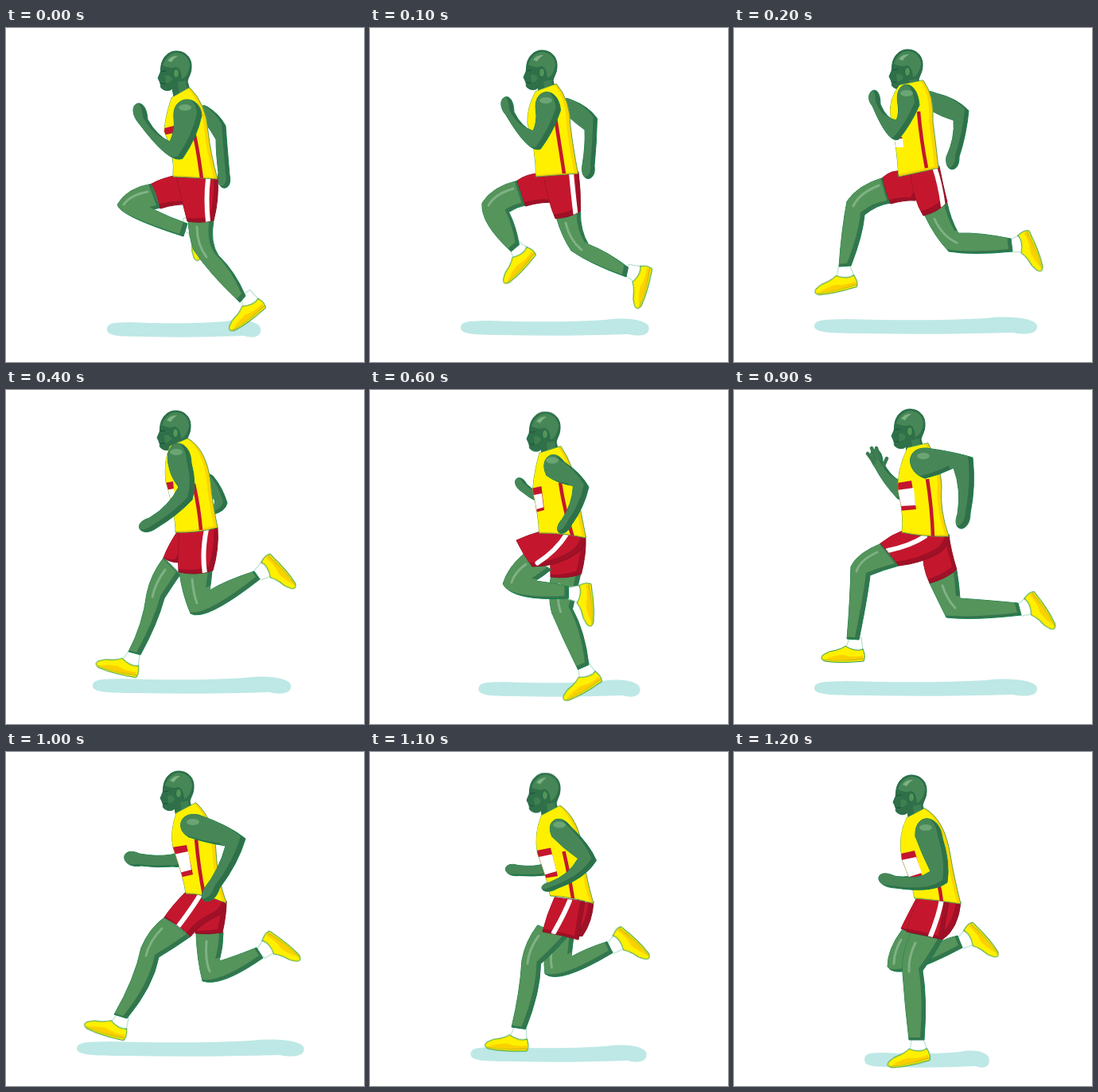
Animation, 450 px wide and 420 px high, one loop 1300 ms. Source, as an HTML page without scripts:

```html
<!DOCTYPE html>
<html lang="en">
<head>
<meta charset="utf-8">
<title>Runner</title>
<style>
html,body{margin:0;width:100%;height:100%;overflow:hidden;background:#fff}
svg{display:block;width:450px;height:420px}
[class]{animation:1.3s steps(2) infinite}
.shadow{animation-name:shadow}.head{animation-name:head}.fingers{animation-name:fingers}
.vest{animation-name:vest}.bib{animation-name:bib}.card{animation-name:card}.seam{animation-name:seam}
.nArm{animation-name:nArm}.fArm{animation-name:fArm}.ball{animation-name:ball}
.nLeg{animation-name:nLeg}.fLeg{animation-name:fLeg}
.nShine{animation-name:nShine}.fShine{animation-name:fShine}
.nShort{animation-name:nShort}.fShort{animation-name:fShort}.stripe{animation-name:stripe}
.nFoot{animation-name:nFoot}.fFoot{animation-name:fFoot}

/* two-step spans add the in-between pose, one-step spans hold */
@keyframes shadow{
0%{transform:translate(127px,368px) scaleX(.69)}
15.384%{transform:translate(101px,364px);animation-timing-function:steps(1)}
23.076%{transform:translate(86px,362px) scaleX(1.01);animation-timing-function:steps(1)}
30.769%{transform:translate(109px,361px) scaleX(.89);animation-timing-function:steps(1)}
38.461%{transform:translate(136px,366px) scaleX(.68)}
53.846%{transform:translate(137px,364px) scaleX(.77)}
69.23%{transform:translate(101px,364px);animation-timing-function:steps(1)}
76.923%{transform:translate(89px,362px) scaleX(1.02)}
92.307%{transform:translate(164px,376px) scaleX(.56);animation-timing-function:steps(1)}
}
@keyframes head{
0%{transform:translate(0,0)}
15.384%{transform:translate(4px,-2px)}
30.769%{transform:translate(-1px,-3px);animation-timing-function:steps(1)}
38.461%{transform:translate(3px,-1px)}
53.846%{transform:translate(9px,-2px)}
69.23%{transform:translate(7px,-5px);animation-timing-function:steps(1)}
76.923%{transform:translate(3px,-5px)}
92.307%{transform:translate(9px,0);animation-timing-function:steps(1)}
}
@keyframes ball{
0%{transform:translate(225px,100px)}
15.384%{transform:translate(217px,82px)}
30.769%{transform:translate(214px,78px);animation-timing-function:steps(1)}
38.461%{transform:translate(226px,88px)}
53.846%{transform:translate(232px,89px)}
69.23%{transform:translate(238px,83px);animation-timing-function:steps(1)}
76.923%{transform:translate(235px,88px)}
92.307%{transform:translate(241px,95px);animation-timing-function:steps(1)}
}
@keyframes fingers{
0%,38.461%{opacity:0;animation-timing-function:steps(1)}
53.846%{opacity:1;transform:translate(0,0)}
69.23%{opacity:1;transform:translate(4px,9px);animation-timing-function:steps(1)}
76.923%,100%{opacity:0;animation-timing-function:steps(1)}
}
@keyframes vest{
0%{d:path("M208 88Q200 112 199 130Q213 160 210 187Q236 188 266 190Q257 158 254 130Q252 96 231 75Z")}
15.384%{d:path("M208 72Q194 90 197 110Q205 150 207 187Q230 182 257 176Q253 140 250 118Q252 85 238 66Z")}
30.769%{d:path("M206 71Q198 90 201 115Q214 160 213 179Q240 180 266 173Q259 140 257 115Q252 75 229 61Z");animation-timing-function:steps(1)}
38.461%{d:path("M210 79Q200 98 204 124Q214 162 214 182Q242 183 271 184Q264 147 262 122Q256 82 233 69Z")}
53.846%{d:path("M216 80Q213 105 205 128Q211 160 211 178Q245 176 272 188Q266 160 258 130Q256 106 247 73Z")}
69.23%{d:path("M218 73Q203 105 207 130Q214 160 211 179Q240 185 270 184Q258 150 261 120Q260 95 244 67Z");animation-timing-function:steps(1)}
76.923%{d:path("M214 77Q206 100 210 120Q224 160 226 178Q250 178 277 190Q265 155 264 125Q262 85 239 64Z")}
92.307%{d:path("M217 83Q206 105 211 135Q224 165 227 184Q255 186 285 191Q276 155 272 130Q265 85 240 71Z");animation-timing-function:steps(1)}
}
@keyframes bib{
0%{d:path("M195 127L211 123L211 132L196 135Z")}
15.384%{d:path("M199 137L211 137L212 140L201 141Z")}
30.769%{d:path("M199 117L210 115L211 126L200 126Z");animation-timing-function:steps(1)}
38.461%{d:path("M202 122L217 119L220 145L206 148Z")}
53.846%{d:path("M202 126L214 123L218 157L205 161Z")}
69.23%{d:path("M204 117L223 114L229 150L208 152Z");animation-timing-function:steps(1)}
76.923%{d:path("M208 120L227 117L235 154L214 159Z")}
92.307%{d:path("M209 128L227 124L237 158L216 160Z");animation-timing-function:steps(1)}
}
@keyframes card{
0%{d:path("M196 135L199 135L199 136L196 136Z")}
15.384%{d:path("M199 139L212 139L213 150L201 150Z")}
30.769%{d:path("M200 126L211 124L213 138L203 144Z");animation-timing-function:steps(1)}
38.461%{d:path("M202 130L218 127L220 143L206 146Z")}
53.846%{d:path("M202 136L214 133L216 152L205 156Z")}
69.23%{d:path("M205 126L226 123L228 145L208 146Z");animation-timing-function:steps(1)}
76.923%{d:path("M210 129L229 125L233 148L214 153Z")}
92.307%{d:path("M210 136L229 132L236 152L217 158Z");animation-timing-function:steps(1)}
}
@keyframes seam{
0%{d:path("M235 127Q241 150 246 190")}
15.384%{d:path("M232 105Q235 140 242 176")}
30.769%{d:path("M236 118Q243 150 245 176");animation-timing-function:steps(1)}
38.461%{d:path("M243 120Q250 150 254 184")}
53.846%{d:path("M235 113Q238 150 255 183")}
69.23%{d:path("M243 112Q249 150 250 185");animation-timing-function:steps(1)}
76.923%{d:path("M239 110Q242 145 249 180")}
92.307%{d:path("M248 140Q258 160 261 188");animation-timing-function:steps(1)}
}
@keyframes nArm{
0%{d:path("M211 112C208 84 244 82 246 110Q240 138 222 164Q206 172 168 121C146 96 176 80 178 115Q190 136 206 143Q213 128 211 112Z")}
15.384%{d:path("M206 95C200 66 230 60 233 97Q222 122 207 140Q194 146 174 98C160 82 184 64 184 96Q192 115 204 116Q208 108 206 95Z")}
30.769%{d:path("M204 92C198 60 232 58 233 92Q240 118 234 138Q215 158 190 173C170 188 156 168 180 161Q205 146 217 122Q206 108 204 92Z");animation-timing-function:steps(1)}
38.461%{d:path("M214 104C210 70 244 68 246 98Q262 122 260 146Q242 168 216 180C196 188 188 170 208 165Q230 158 240 138Q226 122 214 104Z")}
53.846%{d:path("M230 111C212 102 218 74 242 83Q268 86 290 98Q296 128 292 157C294 190 264 190 275 160Q279 128 271 103Q245 113 230 111Z")}
69.23%{d:path("M240 111C216 104 214 72 242 73Q278 78 300 85Q304 120 297 155C297 181 272 180 281 156Q286 125 276 98Q258 107 240 111Z");animation-timing-function:steps(1)}
76.923%{d:path("M230 107C212 98 218 74 242 79Q280 92 301 109Q292 140 268 172C262 194 238 192 249 172Q268 148 276 118Q250 114 230 107Z")}
92.307%{d:path("M228 106C226 76 258 76 262 108Q272 140 268 164Q250 178 203 171C174 170 176 144 202 156Q232 162 247 150Q236 128 228 106Z");animation-timing-function:steps(1)}
}
@keyframes fArm{
0%{d:path("M250 118Q240 92 253 99Q268 108 276 123Q278 150 281 185C286 207 262 207 267 182Q264 158 264 140Q258 130 250 118Z")}
15.384%{d:path("M248 104Q230 72 254 82Q280 88 295 104Q292 135 283 162C284 183 264 183 267 162Q278 138 276 116Q262 112 248 104Z")}
30.769%{d:path("M252 125Q245 98 260 108Q272 122 278 142Q276 152 262 156C254 158 250 150 258 148Q264 144 262 138Q256 132 252 125Z");animation-timing-function:steps(1)}
38.461%{d:path("M225 125Q225 105 240 112Q246 125 246 140Q230 158 205 160C190 160 190 148 205 148Q225 146 228 140Q226 132 225 125Z")}
53.846%{d:path("M214 122Q228 118 220 134Q210 146 204 146Q188 128 180 98C154 72 186 54 189 89Q194 114 208 122Q212 122 214 122Z")}
69.23%{d:path("M214 112Q226 118 218 132Q212 138 206 137Q188 118 177 97C160 74 186 64 187 90Q196 108 208 114Q212 112 214 112Z");animation-timing-function:steps(1)}
76.923%{d:path("M218 126Q226 130 222 142Q216 146 210 144Q190 146 170 143C142 148 142 116 168 128Q190 132 208 129Q214 127 218 126Z")}
92.307%{d:path("M235 130Q250 130 250 140Q248 160 240 165Q220 168 205 168C188 168 188 156 204 157Q222 158 230 152Q234 140 235 130Z");animation-timing-function:steps(1)}
}
@keyframes nLeg{
0%{d:path("M229 242Q230 262 236 279Q255 308 294 345L301 337Q288 306 267 286Q256 270 261 242Z")}
15.384%{d:path("M240 236Q252 262 270 281Q300 286 350 281L348 265Q310 257 282 258Q272 240 268 220Z")}
30.769%{d:path("M218 230Q222 258 232 281Q250 292 319 238L312 228Q275 240 256 252Q258 240 259 227Z");animation-timing-function:steps(1)}
38.461%{d:path("M203 222Q192 250 196 270Q214 292 286 253L280 238Q258 244 238 254Q248 242 252 230Z")}
53.846%{d:path("M184 190Q155 195 138 218Q145 240 213 271L219 257Q200 240 178 226Q190 224 203 222Z")}
69.23%{d:path("M185 193Q155 205 147 222Q146 265 142 313L157 314Q168 260 171 233Q188 226 207 221Z");animation-timing-function:steps(1)}
76.923%{d:path("M199 208Q180 222 170 246Q162 285 136 330L152 335Q185 295 192 258Q212 246 232 232Z")}
92.307%{d:path("M222 228Q210 255 212 278Q215 320 220 362L239 362Q243 310 237 275Q250 258 262 236Z");animation-timing-function:steps(1)}
}
@keyframes fLeg{
0%{d:path("M183 196Q152 201 140 222Q142 236 223 262L228 246Q205 238 185 228Q190 227 194 226Z")}
15.384%{d:path("M188 188Q155 198 142 218Q135 255 132 300L147 299Q162 260 164 235Q180 222 197 220Z")}
30.769%{d:path("M198 211Q182 232 177 256Q172 295 154 329L169 333Q190 295 199 262Q210 245 219 232Z");animation-timing-function:steps(1)}
38.461%{d:path("M216 228Q204 252 203 278Q204 320 198 357L217 358Q228 310 227 278Q245 258 256 232Z")}
53.846%{d:path("M239 239Q242 266 254 282Q282 308 325 346L333 333Q312 296 282 273Q272 258 273 233Z")}
69.23%{d:path("M246 243Q258 268 267 286Q300 290 361 283L357 268Q315 264 284 262Q283 245 280 227Z");animation-timing-function:steps(1)}
76.923%{d:path("M239 228Q240 260 247 288Q270 296 323 259L315 246Q285 258 268 263Q273 245 273 227Z")}
92.307%{d:path("M211 224Q193 248 193 270Q205 290 287 246L281 231Q258 236 238 252Q236 240 240 230Z");animation-timing-function:steps(1)}
}
@keyframes nShine{
0%{d:path("M240 250Q240 272 252 288")}
15.384%{d:path("M252 240Q262 262 280 270")}
30.769%{d:path("M234 238Q236 258 240 268");animation-timing-function:steps(1)}
38.461%{d:path("M212 238Q204 255 208 268")}
53.846%{d:path("M180 200Q158 205 148 216")}
69.23%{d:path("M180 204Q158 214 154 228");animation-timing-function:steps(1)}
76.923%{d:path("M196 222Q180 238 176 256")}
92.307%{d:path("M228 240Q219 258 220 276");animation-timing-function:steps(1)}
}
@keyframes fShine{
0%{d:path("M178 206Q156 210 148 222")}
15.384%{d:path("M182 198Q157 208 150 224")}
30.769%{d:path("M200 226Q188 242 184 260");animation-timing-function:steps(1)}
38.461%{d:path("M224 240Q212 258 211 276")}
53.846%{d:path("M252 248Q256 268 268 282")}
69.23%{d:path("M262 246Q268 264 278 274");animation-timing-function:steps(1)}
76.923%{d:path("M252 238Q250 262 256 276")}
92.307%{d:path("M210 236Q201 252 201 266");animation-timing-function:steps(1)}
}
@keyframes nShort{
0%{d:path("M214 186Q222 220 228 243Q245 246 261 242Q268 215 266 188Z")}
15.384%{d:path("M222 180Q225 215 238 236Q255 232 268 219Q262 195 258 174Z")}
30.769%{d:path("M218 177Q216 205 217 229Q240 234 260 227Q268 200 266 173Z");animation-timing-function:steps(1)}
38.461%{d:path("M216 180Q208 202 203 222Q228 232 252 230Q272 210 270 182Z")}
53.846%{d:path("M214 178Q197 183 184 189Q192 206 204 222Q238 222 262 204Q270 195 270 185Z")}
69.23%{d:path("M212 177Q198 182 184 193Q196 205 207 221Q235 218 258 205Q272 195 270 182Z");animation-timing-function:steps(1)}
76.923%{d:path("M226 176Q208 194 199 208Q218 218 232 232Q245 215 268 205Q277 197 277 188Z")}
92.307%{d:path("M232 183Q222 205 217 226Q240 230 262 236Q266 210 270 188Z");animation-timing-function:steps(1)}
}
@keyframes fShort{
0%{d:path("M215 185Q195 189 183 196Q190 208 194 227Q215 220 240 222Q245 200 245 188Z")}
15.384%{d:path("M212 180Q198 178 187 188Q190 205 197 221Q215 216 228 217Q240 195 240 178Z")}
30.769%{d:path("M216 177Q204 195 198 211Q206 217 218 217Q230 200 230 178Z");animation-timing-function:steps(1)}
38.461%{d:path("M222 181Q220 205 216 230Q238 236 258 230Q270 205 271 182Z")}
53.846%{d:path("M235 190Q232 218 238 240Q255 240 273 233Q274 208 271 186Z")}
69.23%{d:path("M238 195Q235 220 246 243Q265 238 280 226Q272 200 270 182Z");animation-timing-function:steps(1)}
76.923%{d:path("M240 205Q237 215 238 228Q255 230 272 227Q277 205 277 188Z")}
92.307%{d:path("M230 183Q218 205 210 222Q240 235 262 236Q282 222 285 189Z");animation-timing-function:steps(1)}
}
@keyframes stripe{
0%{d:path("M254 190Q251 215 254 244")}
15.384%{d:path("M252 175Q259 195 263 224")}
30.769%{d:path("M252 175Q246 205 250 231");animation-timing-function:steps(1)}
38.461%{d:path("M250 181Q243 205 229 232")}
53.846%{d:path("M246 179Q225 200 192 203")}
69.23%{d:path("M240 184Q222 196 193 202");animation-timing-function:steps(1)}
76.923%{d:path("M245 178Q235 195 216 220")}
92.307%{d:path("M261 185Q258 205 246 234");animation-timing-function:steps(1)}
}
@keyframes nFoot{
0%{transform:translate(302px,335px) rotate(-36deg)}
15.384%{transform:translate(348px,274px) rotate(-111deg)}
30.769%{transform:translate(317px,232px) rotate(-131deg);animation-timing-function:steps(1)}
38.461%{transform:translate(283px,246px) rotate(-125deg)}
53.846%{transform:translate(218px,265px) rotate(-62deg)}
69.23%{transform:translate(153px,313px) rotate(0deg);animation-timing-function:steps(1)}
76.923%{transform:translate(147px,333px) rotate(18deg)}
92.307%{transform:translate(231px,362px) rotate(-11deg);animation-timing-function:steps(1)}
}
@keyframes fFoot{
0%{transform:translate(224px,246px) rotate(-80deg)}
15.384%{transform:translate(139px,300px) rotate(-12deg)}
30.769%{transform:translate(161px,332px) rotate(15deg);animation-timing-function:steps(1)}
38.461%{transform:translate(208px,358px) rotate(-4deg)}
53.846%{transform:translate(330px,336px) rotate(-55deg)}
69.23%{transform:translate(359px,277px) rotate(-123deg);animation-timing-function:steps(1)}
76.923%{transform:translate(321px,253px) rotate(-141deg)}
92.307%{transform:translate(285px,240px) rotate(-131deg);animation-timing-function:steps(1)}
}
</style>
</head>
<body>
<svg viewBox="0 0 450 420" stroke-linejoin="round" stroke-linecap="round" fill="none">
<defs>
<clipPath id="cVest"><path class="vest"/></clipPath>
<clipPath id="cNArm"><path class="nArm"/></clipPath>
<clipPath id="cFArm"><path class="fArm"/></clipPath>
<clipPath id="cNLeg"><path class="nLeg"/></clipPath>
<clipPath id="cFLeg"><path class="fLeg"/></clipPath>
<clipPath id="cNShort"><path class="nShort"/></clipPath>
<clipPath id="cFShort"><path class="fShort"/></clipPath>
<g id="foot">
<path d="M-7 -2L7 -2L9 15L-13 14Z" fill="#fff" stroke="#8fcfb4" stroke-width=".8"/>
<path d="M9 13Q13 21 10 28Q-20 31 -39 28Q-46 25 -41 20Q-34 15 -24 14Q-17 12 -13 9Q0 17 9 13Z" fill="#fff000" stroke="#2f9a4e"/>
<path d="M-38 25Q-28 21 -16 20Q-4 24 9 21L9 26Q-18 28 -38 25Z" fill="#fbd000"/>
<path d="M-41 26Q-15 29 10 25" stroke="#a9a52a" stroke-width=".8"/>
</g>
</defs>

<path class="shadow" fill="#bde8e5" d="M0 11C0 1 20 3 40 2Q140 5 215 1C250 -3 280 2 280 11C281 22 262 22 250 19Q150 22 60 20C20 20 0 19 0 11Z"/>

<path class="fArm" fill="#2f7049" stroke="#14804f"/>
<g clip-path="url(#cFArm)"><path class="fArm" fill="#478757" transform="translate(-5 -2)"/></g>
<path class="fingers" d="M172 82L164 71M174 78L169 64M179 78L175 64M184 86L188 77" stroke="#3b7b50" stroke-width="4.500"/>

<g class="fFoot"><use href="#foot"/></g>
<path class="fLeg" fill="#34754d" stroke="#14804f"/>
<g clip-path="url(#cFLeg)"><path class="fLeg" fill="#55945a" transform="translate(-5 -3)"/></g>
<path class="fShine" stroke="#7fb284" stroke-width="3"/>
<path class="fShort" fill="#a01026" stroke="#8c1226"/>
<g clip-path="url(#cFShort)"><path class="fShort" fill="#c4172e" transform="translate(-6 -4)"/></g>

<g class="nFoot"><use href="#foot"/></g>
<path class="nLeg" fill="#34754d" stroke="#14804f"/>
<g clip-path="url(#cNLeg)"><path class="nLeg" fill="#55945a" transform="translate(-5 -3)"/></g>
<path class="nShine" stroke="#7fb284" stroke-width="3"/>
<path class="nShort" fill="#a01026" stroke="#8c1226"/>
<g clip-path="url(#cNShort)">
<path class="nShort" fill="#c4172e" transform="translate(-5 -5)"/>
<path class="stripe" stroke="#fff" stroke-width="6"/>
</g>

<g class="head">
<path d="M195 47C197 35 206 29 214 29C226 29 234 38 233 50C233 57 229 62 228 67L232 82L212 92L209 76C206 80 199 79 196 76C193 74 195 72 194 70L193 67L191 63L194 56Z" fill="#2f7049" stroke="#1d6b45"/>
<path d="M197 47C201 36 208 31 215 31C225 32 231 39 231 48Q228 62 221 64Q220 50 213 49Q206 52 197 47Z" fill="#478757"/>
<path d="M203 41Q208 34 216 35Q211 38 208 43Z" fill="#7fb284"/>
<path d="M200 60Q206 58 209 64Q206 70 201 69ZM216 68L226 66L228 80L218 84Z" fill="#3f8053"/>
<ellipse cx="214" cy="57" rx="3.500" ry="5.500" fill="#559458" stroke="#1d6b45"/>
<path d="M195 55L201 54M195 70L200 70" stroke="#174f36"/>
</g>

<path class="vest" fill="#fcd500" stroke="#5aa24a"/>
<g clip-path="url(#cVest)">
<path class="vest" fill="#fff000" transform="translate(-5 -2)"/>
<path class="seam" stroke="#c4172e" stroke-width="4.500" stroke-linecap="butt"/>
<path class="bib" fill="#c4172e"/>
<path class="card" fill="#fff"/>
</g>

<path class="nArm" fill="#2f7049" stroke="#14804f"/>
<g clip-path="url(#cNArm)"><path class="nArm" fill="#478757" transform="translate(-6 -3)"/></g>
<ellipse class="ball" rx="8" ry="4" fill="#6ba573"/>
</svg>
</body>
</html>
```
